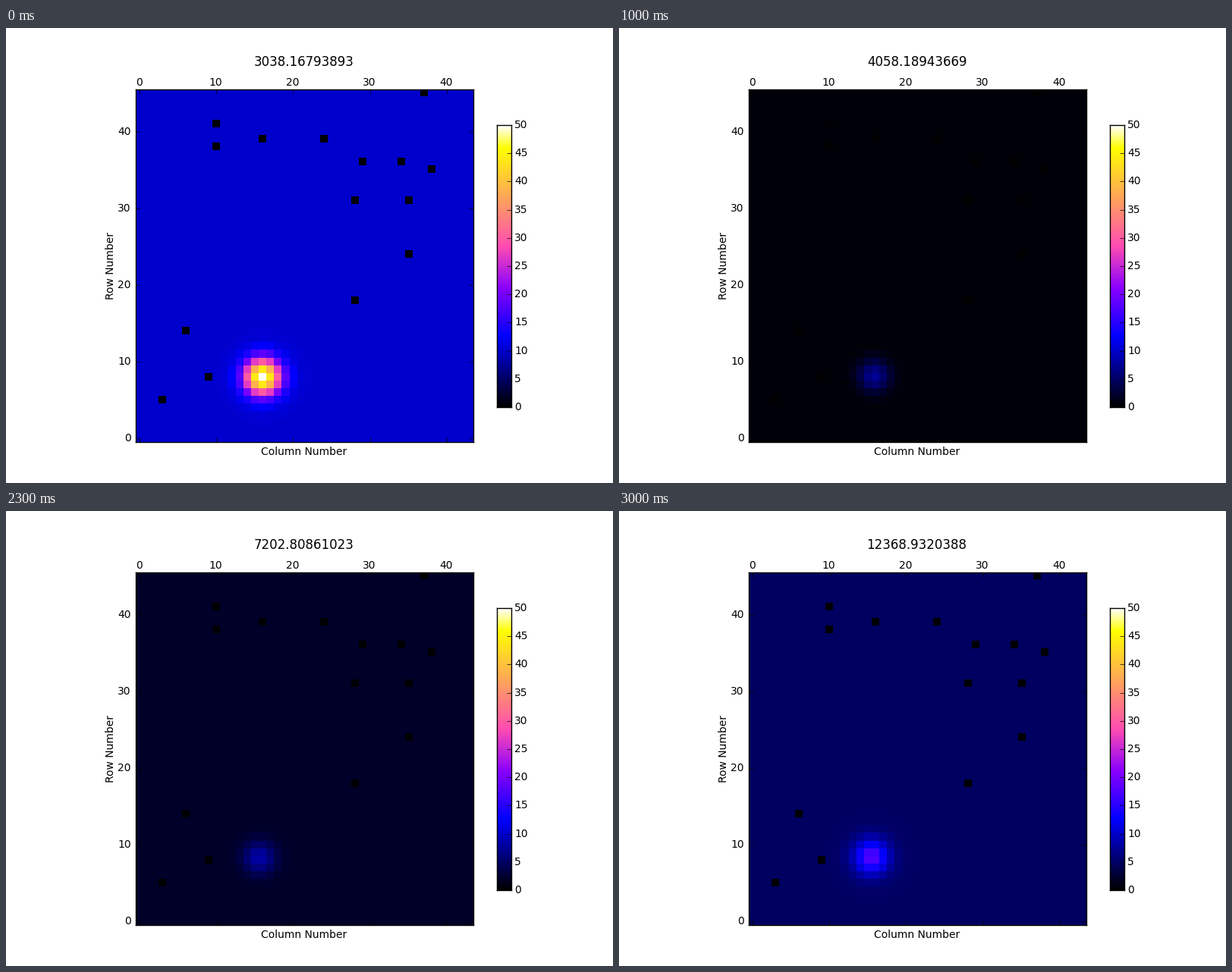
Recreate the animation shown at these times as a matplotlib script. Size 800 by 600 pixels, loop 3.1 s.

```python
import math
import numpy as np
import matplotlib.pyplot as plt
from matplotlib.animation import FuncAnimation

W, H, DPI = 800, 600, 100
FRAMES, STEP_MS = 31, 100
COLS, ROWS, VMAX = 44, 46, 50

plt.rcParams.update({"font.family": "DejaVu Sans", "font.size": 10})

# Bin edges are evenly spaced in 1/wavelength; titles show bin midpoints.
edges = 1 / np.linspace(1 / 3000, 1 / 13000, FRAMES + 1)
waves = (edges[:-1] + edges[1:]) / 2

# Dead detector cells as (column, row).
DEAD = [(3, 5), (9, 8), (6, 14), (28, 18), (35, 24), (28, 31), (35, 31),
        (38, 35), (34, 36), (29, 36), (16, 39), (24, 39), (10, 38),
        (10, 41), (37, 45)]
dead_x, dead_y = np.array(DEAD).T
grid_y, grid_x = np.mgrid[:ROWS, :COLS]


def hump(i, centre, width):
    return math.exp(-((i - centre) / width) ** 2)


def counts(i):
    """Sky glow plus a slowly drifting star seen in wavelength bin i."""
    flash = math.exp(-2 * i)
    sky = 10 * flash + 0.1125 * math.exp(i / 8) + 2.7 * hump(i, 27, 1.6)
    star = 40 * flash + 10.5 * hump(i, 15, 7.5) + 13 * math.exp((i - 30) / 5)
    sigma = 1.4 + 0.25 * ((i - 16) / 15) ** 2
    r2 = (grid_x - 16 + 0.018 * i) ** 2 + (grid_y - 8 - 0.012 * i) ** 2
    img = sky + star * np.exp(-r2 / (2 * sigma ** 2))
    img[dead_y, dead_x] = 0
    return img


fig = plt.figure(figsize=(W / DPI, H / DPI), dpi=DPI, facecolor="white")


def panel(x, y, w, h):
    """Axes placed by its left and bottom edge in pixels."""
    ax = fig.add_axes([x / W, y / H, w / W, h / H])
    for spine in ax.spines.values():
        spine.set_linewidth(1)
    ax.tick_params(direction="in", length=4, width=0.5, right=True,
                   labelleft=False, labelbottom=False)
    return ax


def label(x, y, text, ha="center", **style):
    """Text at x on a baseline y pixels below the top."""
    return fig.text(x / W, 1 - y / H, text, ha=ha, va="baseline",
                    rotation_mode="anchor", **style)


side, bottom = 465, 54
cell = side / ROWS
width = cell * COLS
left = 616 - width
mid_x = left + width / 2 - 1

# The picture covers whole pixels, slightly more than the axes.
x0 = -0.5 - (left - math.floor(left)) / cell
y0 = -0.5
extent = (x0, x0 + (math.ceil(width) + 1) / cell, y0, y0 + (side + 1) / cell)

ax = panel(left, bottom, width, side)
image = ax.imshow(counts(0), cmap="gnuplot2", vmin=0, vmax=VMAX,
                  origin="lower", interpolation="nearest", aspect="auto",
                  extent=extent)
ax.set(xlim=(-0.5, COLS - 0.5), ylim=(-0.5, ROWS - 0.5),
       xticks=range(0, COLS, 10), yticks=range(0, ROWS, 10))
ax.tick_params(top=True)
for n in range(0, COLS, 10):
    offset = (n + 0.5) * cell
    label(left + offset - 1, 76, n)
    label(164.6, H - bottom - offset + 4.5, n, ha="right")

bar = panel(647, 100, 18.6, 372)
bar.imshow(np.linspace(0, VMAX, 256)[:, None], cmap="gnuplot2",
           origin="lower", aspect="auto", interpolation="nearest",
           extent=(0, 1, 0, VMAX))
bar.set(xticks=[], yticks=range(0, VMAX + 1, 5))
bar.tick_params(left=False)
for n in range(0, VMAX + 1, 5):
    label(670.4, 504 - 372 * n / VMAX, n, ha="left")

title = label(mid_x, 50.5, "", fontsize=12)
label(mid_x, 563, "Column Number")
label(141.5, 313.5, "Row Number", rotation=90)


def update(i):
    image.set_data(counts(i))
    title.set_text(f"{waves[i]:.12g}")
    return image, title


anim = FuncAnimation(fig, update, frames=FRAMES, interval=STEP_MS,
                     repeat=True, repeat_delay=0)
plt.show()
```
